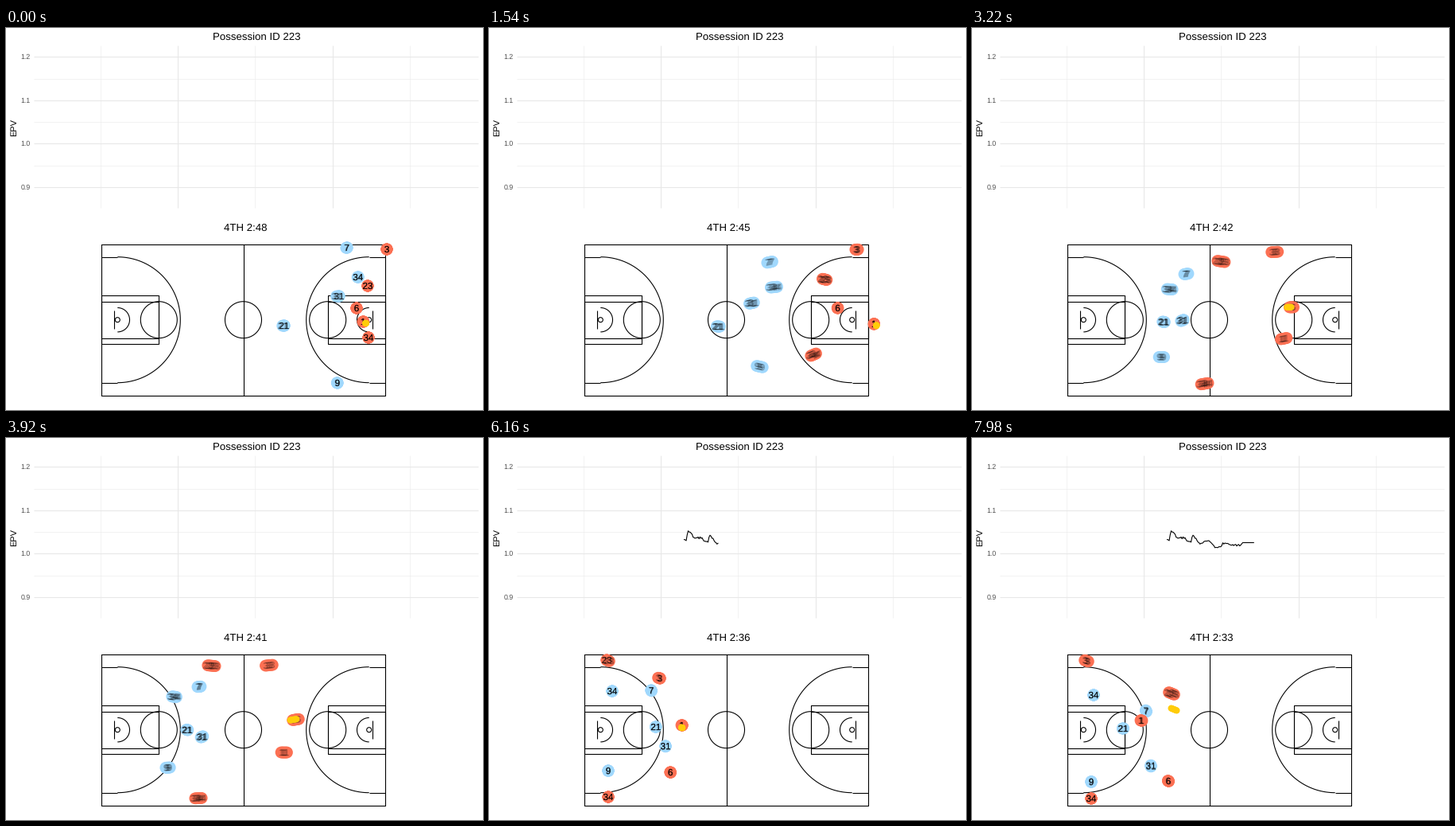
These frames come from a looping animation (600 by 480 pixels, 8 s). A matplotlib script:

```python
import numpy as np
import matplotlib.pyplot as plt
from matplotlib.animation import FuncAnimation
from matplotlib.collections import LineCollection, PathCollection
from matplotlib.path import Path
from matplotlib.textpath import TextPath
from matplotlib.transforms import Affine2D, IdentityTransform

W, H, DPI = 600, 480, 100
PX = 72 / DPI
FONT = "Liberation Sans"
TICKS_PER_STEP = 7      # 20 ms ticks, 140 ms per step
SAMPLES = 7             # positions overlaid in one step
SET_UP, LAST = 44, 57   # steps: players reach their spots, loop ends
BLUE, RED, GOLD = "#a0d8fd", "#fc7053", "#ffcc0a"

plt.rcParams["text.hinting"] = "none"
fig = plt.figure(figsize=(W / DPI, H / DPI), dpi=DPI, facecolor="white")
ax = fig.add_axes([0, 0, 1, 1])
ax.set_xlim(0, W)
ax.set_ylim(H, 0)
ax.axis("off")


def label(x, y, text, size, va="baseline", ha="center", **kw):
    return ax.text(x, y, text, fontsize=size * PX, family=FONT, va=va, ha=ha, **kw)


def lines(segs, color, width):
    segs = [np.array(s) - 0.7 for s in segs]
    ax.add_collection(LineCollection(segs, colors=color, linewidths=width * PX,
                                     zorder=1), autolim=False)


def arc(cx, cy, r, a0=0, a1=360):
    a = np.radians(np.linspace(a0, a1, 91))
    return np.column_stack([cx + r * np.cos(a), cy + r * np.sin(a)])


def box(x0, y0, x1, y1):
    return [(x0, y0), (x1, y0), (x1, y1), (x0, y1), (x0, y0)]


# Chart panel: minor lines lie halfway between major ones
def grid(xs, ys, color, width):
    lines([[(36, y), (595, y)] for y in ys] +
          [[(x, 23), (x, 227)] for x in xs], color, width)


ROW, COL = 54.5, 194.4
major_y = 37 + ROW * np.arange(4)
grid(119.7 + COL * np.arange(3), major_y[:3] + ROW / 2, "#ebebeb", 0.6)
grid(216.9 + COL * np.arange(2), major_y, "#e8e8e8", 1.1)
for i, y in enumerate(major_y):
    label(31, y + 2.4, f"{1.2 - i / 10:.1f}", 8.8, ha="right", color="#4d4d4d")
label(10.3, 124.7, "EPV", 11, va="center", rotation=90)
label(315, 15, "Possession ID 223", 13.2)
clock = label(301, 255, "", 13.2)

# Court
MID_X, MID_Y = 299.2, 367.4
half = [
    [(141, MID_Y - 79), (121, MID_Y - 79)],
    [(141, MID_Y + 79), (121, MID_Y + 79)],
    arc(141, MID_Y, 79, -90, 90),
    box(121, 337, 193, 398),
    box(121, 344.7, 193, 390.2),
    arc(193, MID_Y, 23),
    arc(141, MID_Y, 3),
    arc(141, MID_Y, 15.2, -90, 90),
    [(136.5, 356), (136.5, 379)],
]
other = [[(2 * MID_X - x, y) for x, y in seg] for seg in half]
lines([box(121, 272.7, 477.8, 462.3), [(MID_X, 272.7), (MID_X, 462.3)],
       arc(MID_X, MID_Y, 23)] + half + other, "black", 1.1)

# Number, start, spot, end, pace (below 1 leaves early), sideways bend of the run
HOME = [
    ("7", (429, 276), (204, 317), (219, 343), 0.68, 5),
    ("34", (443, 313), (155, 318), (153, 323), 0.74, 14),
    ("31", (419, 337), (222, 387), (225, 412), 0.55, -14),
    ("21", (350, 374), (210, 363), (190, 365), 0.56, 6),
    ("9", (417, 446), (150, 418), (150, 432), 0.75, -16),
]
AWAY = [
    ("3", (479, 278), (215, 302), (144, 280), 1.36, -6),
    ("23", (455, 324), (148, 279), (251, 321), 1.15, -10),
    ("6", (441, 352), (228, 420), (247, 431), 2.0, -25),
    ("1", (447, 369), (243, 361), (213, 355), 1.6, 30),
    ("34", (456, 389), (150, 451), (150, 453), 1.0, 25),
]
names, start, spot, end, pace, bend = zip(*(HOME + AWAY))
start, spot, end, pace, bend = map(np.array, (start, spot, end, pace, bend))
P3, P23, P6, P1 = range(5, 9)


def players_at(t):
    u = np.clip(t / SET_UP, 0, 1) ** pace
    p = u * u * (3 - 2 * u)
    drift = max(0, (t - SET_UP) / (LAST - SET_UP))
    xy = start + (spot - start) * p[:, None] + (end - spot) * drift
    xy[:, 1] += bend * np.sin(np.pi * p)
    xy[P1, 0] += 45 * np.exp(-((t - 12) / 7) ** 2)  # steps over the baseline
    return xy


# Who holds the ball, from and until which step, and where beside the player
HOLDS = [
    (P1, 0, 16, (3, 2)),
    (P6, 17.5, 33.6, (-3, 0)),
    (P3, 36.2, 40, (0, 2)),
    (P1, 43, 50, (0, 3)),
    (P23, 55, 60, (3, 20)),
]


def ball_at(t):
    for i, (who, since, until, offset) in enumerate(HOLDS):
        if t <= until:
            here = players_at(max(t, since))[who] + offset
            if t >= since or i == 0:
                return here
            prev, _, left, shift = HOLDS[i - 1]
            there = players_at(left)[prev] + shift
            target = players_at(since)[who] + offset
            return there + (target - there) * (t - left) / (since - left)


def stamps(paths, colors, z):
    col = PathCollection(paths, facecolors=colors, edgecolors="none", zorder=z,
                         offsets=np.zeros((len(colors), 2)),
                         offset_transform=ax.transData, transform=IdentityTransform())
    ax.add_collection(col, autolim=False)
    return col


def disc(r):
    return Path.unit_circle().transformed(Affine2D().scale(r))


def number(text):
    p = TextPath((0, 0), text, size=11.6, prop={"family": FONT})
    b = p.get_extents()
    return p.transformed(Affine2D().translate(-(b.x0 + b.x1) / 2, -(b.y0 + b.y1) / 2))


glyphs = [number(n) for n in names for _ in range(SAMPLES)]
dots = stamps([disc(7.4)], [BLUE] * 5 * SAMPLES + [RED] * 5 * SAMPLES, 4)
digits = stamps(glyphs, [(0, 0, 0, 0.3)] * len(glyphs), 5)
ball = stamps([disc(4.1)], [GOLD] * SAMPLES, 6)

# Value curve: main turns plus a little noise, flat at the end
TURNS = [(245.5, 128), (248, 128), (250, 117.5), (254, 119), (257, 125), (268, 125.5),
         (270, 130), (276, 130), (277.5, 121.5), (286, 133), (297, 128.5), (307, 138),
         (313.5, 136.5), (315, 132.5), (322, 132), (325, 134.5), (338.5, 134.5),
         (340, 131.5), (355.5, 131.5)]
curve_x = np.linspace(245.5, 355.5, 89)
curve_y = np.interp(curve_x, *zip(*TURNS))
curve_y += np.random.default_rng(4).normal(0, 0.6, 89) * (curve_x < 338)
curve, = ax.plot([], [], color="black", lw=1.1 * PX, zorder=3)


def draw(tick):
    step = tick // TICKS_PER_STEP
    times = step + (np.arange(SAMPLES) - SAMPLES // 2) / SAMPLES
    spots = np.stack([players_at(t) for t in times], axis=1).reshape(-1, 2)
    dots.set_offsets(spots)
    digits.set_offsets(spots)
    ball.set_offsets([ball_at(t) for t in times])

    secs = int(168.98 - 0.28 * step)
    clock.set_text(f"4TH {secs // 60}:{secs % 60:02d}")

    seen = curve_x <= 289 + 5.1 * (step - SET_UP)
    curve.set_data(curve_x[seen], curve_y[seen])
    return dots, digits, ball, clock, curve


anim = FuncAnimation(fig, draw, frames=400, interval=20, repeat=True,
                     repeat_delay=0, blit=False)
plt.show()
```
